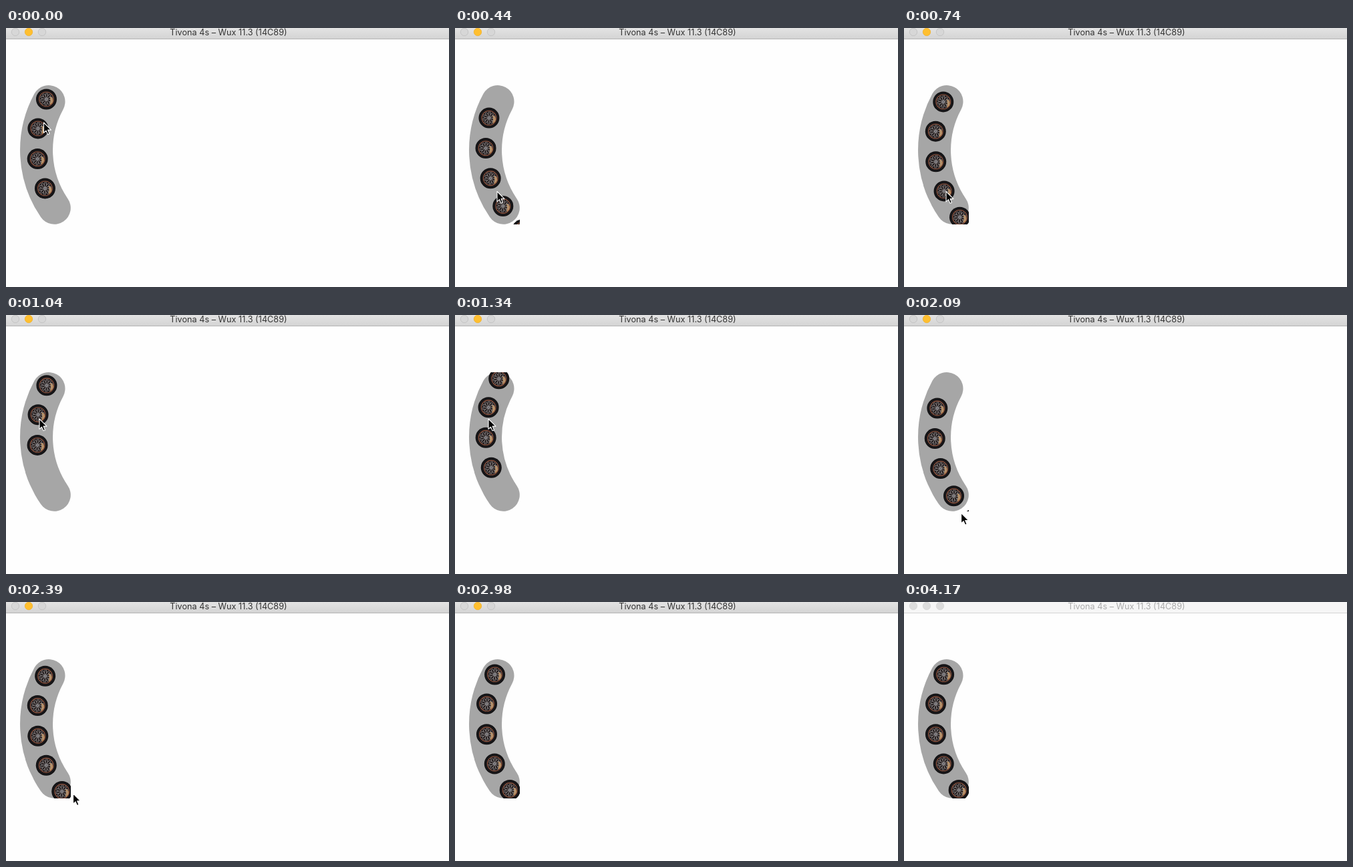
An HTML page that plays this animation: 663 px wide and 389 px high, repeating every 4.27 s.

```html
<!DOCTYPE html>
<html lang="en">
<head>
<meta charset="utf-8">
<title>Arc menu</title>
<style>
  html, body { margin: 0; width: 100%; height: 100%; overflow: hidden; background: #fefefe; }
  svg { display: block; }
  text { font: 12.7px Inter, "Open Sans", sans-serif; text-anchor: middle; }
</style>
</head>
<body>
<svg width="663" height="389" viewBox="0 0 663 389">
  <defs>
    <linearGradient id="bar" x2="0" y2="1">
      <stop stop-color="#e3e3e3"/>
      <stop offset="1" stop-color="#d4d4d4"/>
    </linearGradient>
    <clipPath id="view"><rect y="86" width="97" height="209"/></clipPath>
    <g id="wheel" fill="none">
      <circle r="15.5" fill="#131214"/>
      <circle r="13.2" stroke="#232225" stroke-width=".7"/>
      <circle r="10.9" fill="#231d1e" stroke="#8f5540" stroke-width="1.1"/>
      <path d="M5 -4Q10.5 -3 10 2.5Q9 7 5 8.2Q7 2 5 -4Z" fill="#bd8c57"/>
      <path id="spokes" stroke="#a19c9c" stroke-width=".8"/>
      <circle r="1.9" fill="#6c6a6f" stroke="#b5b2b3" stroke-width=".7"/>
    </g>
  </defs>

  <rect width="663" height="389" fill="#fefefe"/>
  <rect id="top" width="663" height="16"/>
  <rect id="edge" y="16" width="663" height="1"/>
  <g id="buttons">
    <circle cx="14" cy="6" r="5.7"/>
    <circle cx="34" cy="6" r="5.7"/>
    <circle cx="54" cy="6" r="5.7"/>
  </g>
  <text id="title" x="333" y="11.4">Tivona 4s – Wux 11.3 (14C89)</text>

  <path d="M64 110.5A154 154 0 0 0 72.3 270.3" fill="none" stroke="#a6a6a6" stroke-width="49" stroke-linecap="round"/>
  <g id="wheels" clip-path="url(#view)"></g>
  <path id="cursor" d="M0 0V15.4L3.5 12.1L6 17.8L8.5 16.7L6.1 11.1H11Z" fill="#000" stroke="#fff" stroke-width="1.1" stroke-linejoin="round"/>
</svg>
<script>
const LOOP = 4270, BLUR_AT = 4170, STEP = 150;
const COUNT = 5, GAP = 15.1, SPRING = 118;
const ARC = { x: 220, y: 176.3, r: 174 };

// Scroll limits: angle of the first wheel, in degrees
const TOP = -22.8, BOTTOM = -38.2;

// Each drag pulls the list past a limit, holds, then lets it spring back
const DRAGS = [
  { start: 0, end: 300, release: 375, peak: -7, rest: TOP, tip: [63, 245.5] },
  { start: 870, end: 1040, release: 1190, peak: -54.1, rest: BOTTOM, tip: [50, 156] },
  { start: 1640, end: 1790, release: 2010, peak: -1.6, rest: TOP, tip: [85.6, 297.5] }
];
const EXIT = { start: 2390, end: 2840, gone: 2980, from: [100.5, 287.8], to: [531, 373.5] };

const $ = id => document.getElementById(id);
const rad = deg => deg * Math.PI / 180;
const lerp = (a, b, u) => a + (b - a) * u;
const clamp = u => Math.min(1, Math.max(0, u));
const smooth = u => u * u * (3 - 2 * u);
const polar = (r, deg) =>
  `${(r * Math.cos(rad(deg))).toFixed(2)} ${(r * Math.sin(rad(deg))).toFixed(2)}`;
const set = (el, attrs) => {
  for (const k in attrs) el.setAttribute(k, attrs[k]);
};

let mesh = "";
for (let a = 0; a < 360; a += 36) {
  mesh += `M${polar(2, a)}L${polar(5.5, a + 5)}L${polar(9.8, a + 18)}`;
  mesh += `M${polar(5.5, a + 5)}L${polar(9.8, a - 8)}`;
}
set($("spokes"), { d: mesh });

$("wheels").innerHTML = '<use href="#wheel"/>'.repeat(COUNT);
const wheels = [...$("wheels").children];
const buttons = [...$("buttons").children];

// Angle of the first wheel and pointer tip at time t
function pose(t) {
  let angle = BOTTOM - 0.4, tip = [56.5, 142];
  for (const d of DRAGS) {
    if (t < d.start) break;
    const u = clamp((t - d.start) / (d.end - d.start));
    tip = tip.map((v, i) => lerp(v, d.tip[i], u));
    angle = t < d.release
      ? lerp(angle, d.peak, u)
      : d.rest + (d.peak - d.rest) * Math.exp((d.release - t) / SPRING);
  }
  if (t >= EXIT.start) {
    const e = smooth(clamp((t - EXIT.start) / (EXIT.end - EXIT.start)) ** 0.9);
    tip = [
      lerp(EXIT.from[0], EXIT.to[0], e),
      lerp(EXIT.from[1], EXIT.to[1], e ** 1.4)
    ];
  }
  return { angle, tip };
}

function drawBar(active) {
  set($("top"), { fill: active ? "url(#bar)" : "#f6f6f6" });
  set($("edge"), { fill: active ? "#b4b4b4" : "#d3d3d3" });
  set($("title"), { fill: active ? "#333" : "#acacac" });
  buttons.forEach((b, i) => {
    const lit = active && i === 1;
    set(b, {
      fill: lit ? "#ffbf2f" : active ? "#d7d7d7" : "#dcdcdc",
      stroke: lit ? "#efb02e" : active ? "#bfbfbf" : "#d6d6d6",
      "stroke-width": 0.8
    });
  });
}

function draw(t) {
  // The list and pointer move in steps
  const { angle, tip } = pose(Math.floor((t + 10) / STEP) * STEP - 10);
  wheels.forEach((w, i) => {
    const a = rad(angle + i * GAP);
    const x = ARC.x - ARC.r * Math.cos(a);
    const y = ARC.y + ARC.r * Math.sin(a);
    set(w, { transform: `translate(${x.toFixed(2)} ${y.toFixed(2)})` });
  });
  set($("cursor"), {
    visibility: t < EXIT.gone ? "visible" : "hidden",
    transform: `translate(${tip[0].toFixed(1)} ${tip[1].toFixed(1)})`
  });
  drawBar(t < BLUR_AT);
}

let start;
function tick(now) {
  start ??= now;
  draw(Math.max(0, now - start) % LOOP);
  requestAnimationFrame(tick);
}
draw(0);
requestAnimationFrame(tick);
</script>
</body>
</html>
```
